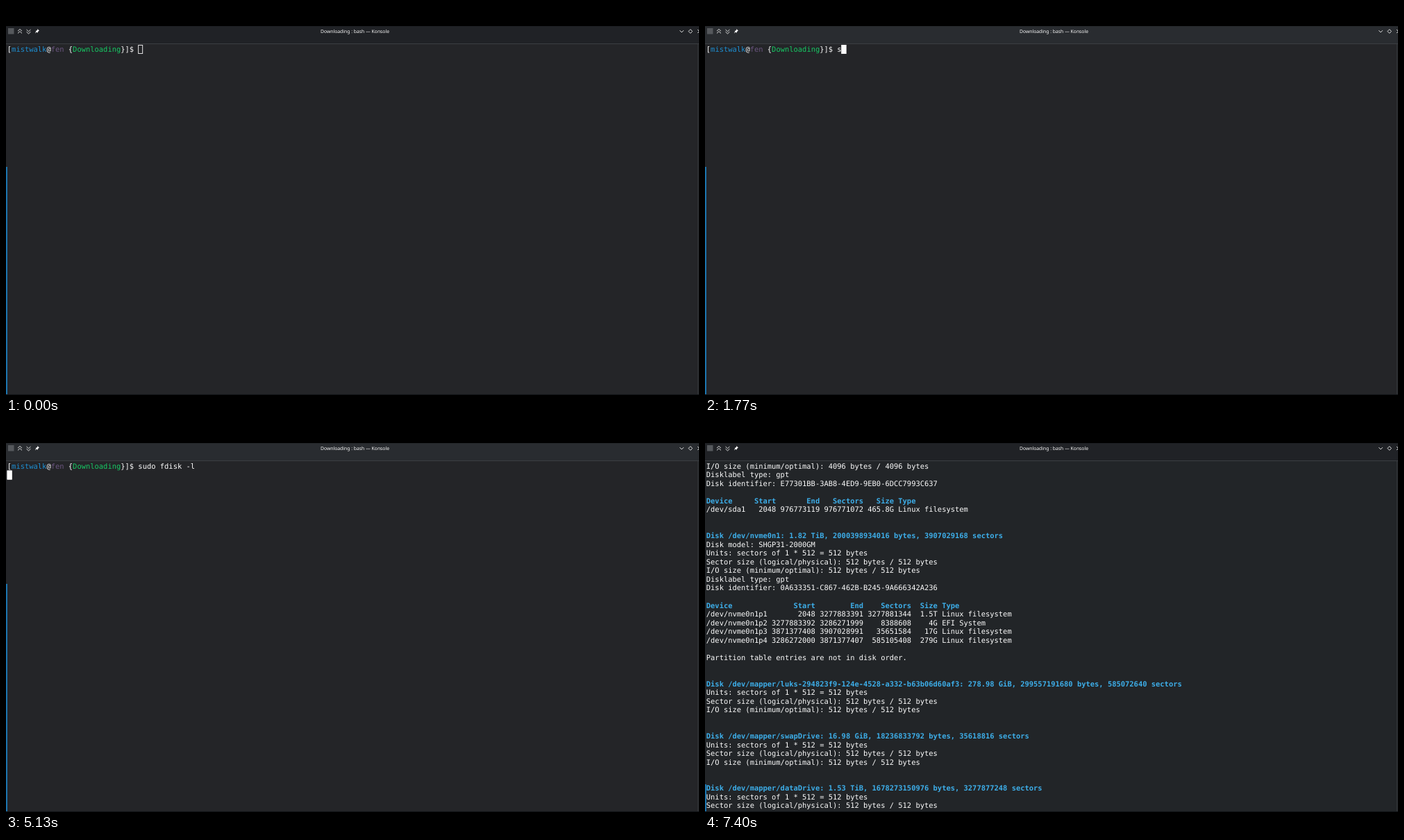
Animation of 998x561 px, one loop 7.56 s. Source, as an HTML page:

```html
<!DOCTYPE html>
<html lang="en">
<head>
<meta charset="utf-8">
<title>Terminal session</title>
<style>
  html, body { margin: 0; width: 100%; height: 100%; overflow: hidden; background: #000; }
  #stage {
    position: relative; width: 998px; height: 561px; overflow: hidden; background: #000;
    text-rendering: geometricPrecision;
  }
  #stage > *, #screen > * { position: absolute; }
  #bar { left: 0; top: 29px; width: 998px; height: 25px; background: #202226; }
  #bar.active { background: #292c30; }
  #title {
    left: 402.5px; top: 29px; width: 200px; height: 15px;
    font: 6.8px/15px "Noto Sans", "Open Sans", sans-serif; color: #fcfcfc;
    text-align: center; white-space: pre;
  }
  #icons { left: 0; top: 29px; fill: none; stroke: #dcdddd; stroke-width: 1; }
  #screen {
    left: 0; top: 54px; width: 998px; height: 507px; overflow: hidden;
    background: #242528; border-top: 1px solid #3b3e42; box-sizing: border-box;
  }
  #screen.full { background: #222528; }
  pre {
    left: 1.8px; top: 1.5px; margin: 0; color: #fcfcfc;
    font: 10.44px/12.565px "DejaVu Sans Mono", monospace;
  }
  pre b { color: #3daee9; }
  .user { color: #1d8fd3; }
  .host { color: #6b5680; }
  .dir { color: #17c964; }
  #caret {
    top: 1px; width: 6.6px; height: 12.5px; box-sizing: border-box;
    border: 1px solid #e4e4e4;
  }
  #caret.solid { background: #fcfcfc; border-color: #fcfcfc; }
  #scroll { left: 0; width: 1.5px; bottom: 0; background: #1c74ad; }
  #edge { right: 1px; top: 0; width: 1px; height: 100%; background: #33363a; }
  #base { left: 0; bottom: 0; width: 100%; height: 1px; background: #111417; }
  #pointer { left: 0; top: 0; }
</style>
</head>
<body>
<div id="stage">
  <div id="bar"></div>
  <div id="title">Downloading : bash — Konsole</div>
  <svg id="icons" width="998" height="25">
    <rect x="3" y="3" width="8.5" height="8.5" fill="#55585c" stroke="none"/>
    <path d="M17 7.2l3-2.8 3 2.8M17 10.4l3-2.8 3 2.8"/>
    <path d="M29.5 5l3 2.8 3-2.8M29.5 8.2l3 2.8 3-2.8"/>
    <path d="M45.3 4l2.7 2.7-1 .4-1.5 2-.2 1-3-3 1-.2 2-1.5z" fill="#fcfcfc" stroke="none"/>
    <path d="M43.8 8.2l-1.7 1.8"/>
    <path d="M970.3 6.2l2.8 2.8 2.8-2.8"/>
    <path d="M985.7 4.7l2.8 2.8-2.8 2.8-2.8-2.8z"/>
    <path d="M996 5l5 5M996 10l5-5"/>
  </svg>
  <div id="screen">
    <pre id="text"></pre>
    <div id="caret"></div>
    <div id="scroll"></div>
    <div id="edge"></div>
    <div id="base"></div>
  </div>
  <svg id="pointer" width="18" height="16">
    <path d="M1 2l4 1 4-1 4 1 3 4 1 4-1-1-1-2-1 5-2-1-1-2-2 4-2-1-1-4-2 4-1-1 1-5-3-3z"
      fill="#aaabad" stroke="#55575a" stroke-width=".6"/>
    <path d="M2 2.6h3M3.5 2.6v6M7 4l2 2 3-1" fill="none" stroke="#ececec" stroke-width=".9"/>
  </svg>
</div>
<script>
const LOOP = 7560, CELL = 6.285, ROW = 12.565, PROMPT_CELLS = 30;
const FOCUS = 1100, BLUR = 7370, ENTER = 5130, OUTPUT = 5170;
const COMMAND = "sudo fdisk -l";
const KEYS = [1770, 1930, 2130, 2230, 2400, 2900, 3330, 3470, 3570, 3730, 3970, 4700, 4830];

// Pointer journeys: start and end time, then the path between them.
const TRIPS = [
  { from: 330, to: 770, a: [-8, 488], b: [438, 350] },
  { from: 770, to: 1200, a: [438, 350], b: [428, 352] },
  { from: 1200, to: 1770, a: [428, 352], b: [428, 352] },
  { from: 6270, to: 6570, a: [428, 352], b: [-8, 296] }
];

const PROMPT = '[<span class="user">mistwalk</span>@<span class="host">fen</span> ' +
  '{<span class="dir">Downloading</span>}]$ ';

const sizes = `Units: sectors of 1 * 512 = 512 bytes
Sector size (logical/physical): 512 bytes / 512 bytes
I/O size (minimum/optimal): 512 bytes / 512 bytes`;

const LISTING = `I/O size (minimum/optimal): 4096 bytes / 4096 bytes
Disklabel type: gpt
Disk identifier: E77301BB-3AB8-4ED9-9EB0-6DCC7993C637

<b>Device     Start       End   Sectors   Size Type</b>
/dev/sda1   2048 976773119 976771072 465.8G Linux filesystem


<b>Disk /dev/nvme0n1: 1.82 TiB, 2000398934016 bytes, 3907029168 sectors</b>
Disk model: SHGP31-2000GM
${sizes}
Disklabel type: gpt
Disk identifier: 0A633351-C867-462B-B245-9A666342A236

<b>Device              Start        End    Sectors  Size Type</b>
/dev/nvme0n1p1       2048 3277883391 3277881344  1.5T Linux filesystem
/dev/nvme0n1p2 3277883392 3286271999    8388608    4G EFI System
/dev/nvme0n1p3 3871377408 3907028991   35651584   17G Linux filesystem
/dev/nvme0n1p4 3286272000 3871377407  585105408  279G Linux filesystem

Partition table entries are not in disk order.


<b>Disk /dev/mapper/luks-294823f9-124e-4528-a332-b63b06d60af3: 278.98 GiB, 299557191680 bytes, 585072640 sectors</b>
${sizes}


<b>Disk /dev/mapper/swapDrive: 16.98 GiB, 18236833792 bytes, 35618816 sectors</b>
${sizes}


<b>Disk /dev/mapper/dataDrive: 1.53 TiB, 1678273150976 bytes, 3277877248 sectors</b>
${sizes}`;

const $ = id => document.getElementById(id);
const [bar, screenBox, text, caret, scroll, pointer] =
  ["bar", "screen", "text", "caret", "scroll", "pointer"].map($);
let shown = "";

function drawText(t) {
  const typed = KEYS.filter(k => k <= t).length;
  const full = t >= OUTPUT;
  const html = full ? LISTING : PROMPT + COMMAND.slice(0, typed);
  if (html !== shown) text.innerHTML = shown = html;

  const entered = t >= ENTER;
  const col = entered ? 0 : PROMPT_CELLS + typed;
  caret.style.transform = `translate(${1.6 + col * CELL}px, ${entered ? ROW : 0}px)`;
  caret.style.display = full ? "none" : "block";
  caret.classList.toggle("solid", t >= FOCUS);
  bar.classList.toggle("active", t >= FOCUS && t < BLUR);
  screenBox.classList.toggle("full", full);
  scroll.style.height = (full ? 40 : 329) + "px";
}

function drawPointer(t) {
  const trip = TRIPS.find(p => t >= p.from && t < p.to);
  pointer.style.display = trip ? "block" : "none";
  if (!trip) return;
  const p = (t - trip.from) / (trip.to - trip.from);
  const ease = p * p * (3 - 2 * p);
  const [x, y] = trip.a.map((v, i) => v + (trip.b[i] - v) * ease);
  pointer.style.transform = `translate(${x - 9}px, ${y - 8}px)`;
}

function draw() {
  const t = performance.now() % LOOP;
  drawText(t);
  drawPointer(t);
  requestAnimationFrame(draw);
}
draw();
</script>
</body>
</html>
```
